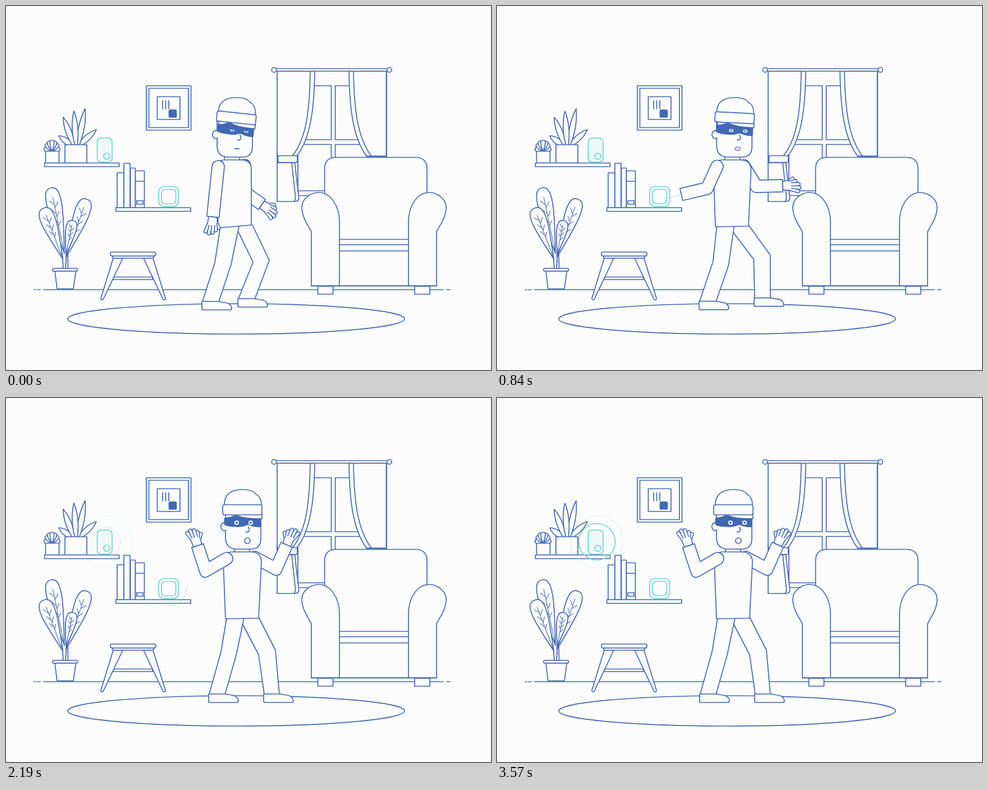
An HTML page that plays this animation: 864x648 px, repeating every 3600 ms.

```html
<!DOCTYPE html>
<html lang="en">
<head>
<meta charset="utf-8">
<title>Room sensor</title>
<style>
  html, body { margin: 0; width: 100%; height: 100%; overflow: hidden; background: #fcfcfc; }
  svg { display: block; width: 100%; height: 100%; }
  .ink { stroke: #4068b4; stroke-width: 1.7; fill: #fcfcfc; stroke-linejoin: round; stroke-linecap: round; }
  .line { fill: none; }
  .solid { fill: #4068b4; }
  .thin { stroke-width: 1.1; fill: none; }
  .teal { stroke: #6dd4cf; stroke-width: 1.7; fill: none; stroke-linecap: round; }
  .bare { stroke: none; }
  .in { stroke: #fcfcfc; stroke-width: 4.2; }
  .out { stroke-width: 7.4; }
</style>
</head>
<body>
<svg viewBox="0 0 864 648">
  <defs>
    <pattern id="mesh" width="2.500" height="2.500" patternUnits="userSpaceOnUse">
      <circle cx="1.250" cy="1.250" r=".6" fill="#6dd4cf" opacity=".6"/>
    </pattern>
    <g id="hand">
      <path class="out" d="M8 5L18 12"/><path class="in" d="M8 5L18 12"/>
      <path class="out" d="M11 -5L27 -10.5"/><path class="in" d="M11 -5L27 -10.5"/>
      <path class="out" d="M11 5L23 7.5"/><path class="in" d="M11 5L23 7.5"/>
      <path class="out" d="M11 -2L29.5 -4.2"/><path class="in" d="M11 -2L29.5 -4.2"/>
      <path class="out" d="M11 2L28 2.200"/><path class="in" d="M11 2L28 2.200"/>
      <path class="bare" d="M0 -7.5L12 -8L15 -6V5L9 8L0 7.5Z"/>
      <path class="line" d="M12 -8.500L0 -7.5V7.5L7 8.500"/>
    </g>
    <path id="shoe" d="M0 0V13Q0 15 2 15H50Q53 15 53 12C52 5 47 2 38 1.5L29 0Z"/>
    <path id="armrest" d="M544 498V402C536 387 527 375 527 358C527 343 543 332 557 332C579 332 594 357 594 384V498Z"/>
    <path id="stoolLeg" d="M191 449L169 520.5Q169 524 173 522.5L208 449Z"/>
  </defs>

  <g class="ink">
    <path class="line" d="M50 505h3M56 505h5M67 505H779M785 505h6"/>
    <ellipse cx="410" cy="557" rx="300" ry="27"/>

    <!-- picture -->
    <rect x="250" y="142" width="79.5" height="79"/>
    <rect x="254.5" y="146.5" width="70.5" height="70"/>
    <rect x="269.5" y="161.5" width="40.5" height="40.5"/>
    <path d="M279 168.500V183M284.500 168.500V183M290 168.500V183"/>
    <rect class="solid" x="290.500" y="185" width="13" height="13" rx="2"/>

    <!-- upper shelf -->
    <g id="petals"></g>
    <rect x="70.5" y="258.500" width="24" height="21"/>
    <g id="blades"></g>
    <rect x="105" y="247" width="39" height="32.500"/>
    <rect x="68.500" y="279.500" width="133" height="6.500"/>

    <!-- lower shelf -->
    <rect x="198" y="297" width="12" height="62"/>
    <rect x="210" y="280" width="11" height="79"/>
    <rect x="221.500" y="288.500" width="9" height="70.500" rx="1"/>
    <rect x="230.500" y="293.500" width="16" height="65.500"/>
    <path d="M230.500 312H246.500"/>
    <rect x="233" y="346.500" width="11" height="6.500"/>
    <rect x="195.500" y="359" width="133.500" height="6.500"/>

    <!-- floor plant -->
    <path class="line" d="M102 467L100 440M106 467Q108 450 107 430M110.500 467L110 435"/>
    <g id="leaves"></g>
    <path d="M87 472L91 503.500H120L124.500 472Z"/>
    <rect x="83" y="467" width="44.500" height="5" rx="2.500"/>

    <!-- stool -->
    <path d="M192 482.500H261V487H190Z"/>
    <use href="#stoolLeg"/>
    <use href="#stoolLeg" transform="matrix(-1 0 0 1 453 0)"/>
    <path d="M189 445H264L262 449H191Z"/>
    <rect x="186" y="438" width="81" height="7" rx="3"/>

    <!-- window -->
    <path d="M520 142H579.500V238H520ZM586.500 142H650V238H586.500ZM520 246.500H579.500V329H520ZM586.500 246.500H650V329H586.500ZM510 337.500H570"/>
    <path d="M483 116H550C549 190 541 238 518 267H483Z"/>
    <path class="line" d="M542 116C541 190 534 238 510 267"/>
    <path d="M483 279V348H516Q522 347 521.500 341L514.500 279Z"/>
    <path class="line" d="M509 279L515.500 339Q516 345 513 348M483 262V280"/>
    <rect x="484.500" y="266.500" width="34.500" height="12" rx="2.500"/>
    <path d="M677.500 116H611C612 190 620 238 643 268H677.500Z"/>
    <path class="line" d="M619 116C620 190 628 238 651 267M678 116V270M642 267H678"/>
    <rect x="480" y="111.500" width="204" height="4.500"/>
    <circle cx="477.500" cy="113.700" r="4.200"/>
    <circle cx="683" cy="113.700" r="4.200"/>

    <!-- armchair -->
    <path d="M567.500 420V290Q567.500 269.500 588 269.500H729Q750 269.500 750 290V420Z"/>
    <path d="M590 415.500H720V498H590ZM594 425H717M594 436H717"/>
    <use href="#armrest"/>
    <use href="#armrest" transform="matrix(-1 0 0 1 1311 0)"/>
    <path d="M544 498.500H767"/>
    <rect x="555.500" y="499" width="27" height="14"/>
    <rect x="728" y="499" width="27" height="14"/>
  </g>

  <!-- sensors -->
  <rect class="teal" x="162.500" y="235" width="26.500" height="43" rx="7" style="fill:url(#mesh)"/>
  <circle class="teal" cx="179.500" cy="267.500" r="5.500" style="fill:#fcfcfc"/>
  <path class="teal" d="M177 267h.1M181 265.500h.1M180 269.500h.1"/>
  <rect class="teal" x="272" y="321.500" width="35.500" height="35.500" rx="9"/>
  <rect class="teal" x="277" y="326.500" width="25.500" height="25.500" rx="6"/>

  <!-- intruder -->
  <g class="ink">
    <path id="armR"/><use id="handR" href="#hand"/>
    <path id="legR"/><use id="shoeR" href="#shoe"/>
    <path id="legL"/><use id="shoeL" href="#shoe"/>
    <rect id="neck" x="407" y="262" width="27" height="14"/>
    <path id="torso"/>
    <g id="head">
      <path d="M391 205V248Q391 269 412 269H436Q454 269 454 250V205Z"/>
      <path d="M392 222C384 220 381 228 384 233C386 237 390 237 392 235"/>
      <path class="line" d="M432 230Q435 236 432 238Q430 239.500 427.500 238"/>
      <ellipse id="mouth" cy="254"/>
      <path id="dome" d="M389 195V190C389 178 394 163 421 163C433 163 441 165 445 171C451 174 455 180 455 190V195Z"/>
      <g id="brow">
        <path d="M391 207V214Q402 213 409 208Q424 216 456 215V207Z"/>
        <path class="solid" d="M389.500 214.500Q402 213 410 210Q425 215.500 454 215V229Q443 229.500 437 227Q431 224 426 227Q419 229.500 405 228.500Q394 228 389.500 225Z"/>
        <g id="eyes">
          <ellipse class="bare" cx="416" cy="222" rx="4"/>
          <ellipse class="bare" cx="441" cy="222" rx="4"/>
          <ellipse class="bare solid" cx="416" cy="222" rx="2"/>
          <ellipse class="bare solid" cx="441" cy="222" rx="2"/>
        </g>
        <rect x="386" y="190" width="70" height="18" rx="3"/>
      </g>
    </g>
    <path id="armL"/><use id="handL" href="#hand"/>
  </g>

  <g id="waves" class="teal"></g>
  <g id="rings" class="teal"></g>
</svg>

<script>
const LOOP = 3600;
const $ = id => document.getElementById(id);
const set = (el, attrs) => { for (const k in attrs) el.setAttribute(k, attrs[k]); return el; };
const add = (parent, tag, attrs) =>
  parent.appendChild(set(document.createElementNS('http://www.w3.org/2000/svg', tag), attrs));
const clamp = x => Math.max(0, Math.min(1, x));
const smooth = (a, b, t) => { const x = clamp((t - a) / (b - a)); return x * x * (3 - 2 * x); };
const mix = (a, b, k) => a.map((v, i) => v + (b[i] - v) * k);
const RAD = Math.PI / 180;

// Leaf drawn along its own x axis, then turned towards the tip.
function leaf(parent, x, y, tx, ty, shape) {
  const len = Math.hypot(tx - x, ty - y), turn = Math.atan2(ty - y, tx - x) / RAD;
  const el = add(parent, 'path', { d: shape(len), transform: `translate(${x} ${y}) rotate(${turn})` });
  return [len, el];
}
const blade = l => `M0 -2Q${l * .55} -9 ${l} 0Q${l * .55} 9 0 2`;
const rounded = w => l =>
  `M0 0C${l * .45} ${-w * .55} ${l * 1.02} ${-w * 1.45} ${l} 0C${l * 1.02} ${w * 1.45} ${l * .45} ${w * .55} 0 0`;

for (const b of [[129, 249, 161, 220], [119, 249, 94, 231], [121, 249, 102, 198],
                 [128, 249, 141, 183], [125, 249, 121, 187]]) leaf($('blades'), ...b, blade);

for (const a of [12, 168, 40, 140, 66, 114, 90])
  leaf($('petals'), 82, 260, 82 + 14 * Math.cos(a * RAD), 257 - 18 * Math.sin(a * RAD), rounded(5));

function veinedLeaf(x, y, tx, ty, w) {
  const [len, el] = leaf($('leaves'), x, y, tx, ty, rounded(w));
  let d = `M0 0H${len * .86}`;
  for (let i = 0; i < 3; i++) {
    const u = len * (.42 + i * .14), v = w * (.3 + i * .06);
    d += `M${u} 0l${w * .5} ${v}M${u + 5} 0l${w * .5} ${-v}`;
  }
  add($('leaves'), 'path', { d, class: 'thin', transform: el.getAttribute('transform') });
}
veinedLeaf(104, 440, 80, 324, 17);
veinedLeaf(107, 447, 144, 344, 17);
veinedLeaf(101, 450, 67, 360, 17);
veinedLeaf(107, 442, 119, 382, 12);

// head: dx, tilt, eye height, mouth x, rx, ry, mouth stroke
// arm: shoulder x, y, upper angle, lower angle, palm side
const poses = [
  { head: [-15, 6, 1.6, 426.5, 4.5, .7, 1],
    torso: [375, 274, 437, 273, 437, 390, 378, 395],
    legL: [382, 392, 372, 457, 350, 526, 379, 527, 401, 460, 415, 392],
    legR: [409, 392, 440, 456, 414, 521, 443, 522, 469, 453, 439, 390],
    armL: [378, 286, 96, 96, -1], armR: [425, 284, 100, 35, -1] },
  { head: [.5, 6, 1.6, 427, 4.5, .7, 1],
    torso: [384, 274, 450, 274, 446, 392, 387, 393],
    legL: [390, 392, 387, 457, 360, 524, 390, 525, 415, 466, 421, 392],
    legR: [409, 392, 465, 445, 458, 512, 487, 513, 494, 437, 446, 390],
    armL: [391, 285, 77.5, 77.5, -1], armR: [436, 285, 90, 66, -1] },
  { head: [0, 0, 4, 430, 5, 5, 1.7],
    torso: [387, 274, 455, 274, 450, 392, 391, 393],
    legL: [393, 392, 383, 452, 362, 527, 390, 528, 410, 458, 424, 392],
    legR: [416, 392, 450, 457, 460, 527, 487, 528, 480, 449, 450, 390],
    armL: [393, 286, 150, 252, 1], armR: [443, 284, 28, -66, -1] }
];

function drawArm(side, [x, y, a1, a2, palm]) {
  const w = 11, p = a1 * RAD, q = a2 * RAD;
  const ex = x + 43 * Math.cos(p), ey = y + 43 * Math.sin(p);
  const hx = ex + 47 * Math.cos(q), hy = ey + 47 * Math.sin(q);
  const n1 = [-Math.sin(p) * w, Math.cos(p) * w], n2 = [-Math.sin(q) * w, Math.cos(q) * w];
  const k = 1 + Math.cos(q - p), m = [(n1[0] + n2[0]) / k, (n1[1] + n2[1]) / k];
  const at = (cx, cy, n, s) => `${cx + n[0] * s} ${cy + n[1] * s} `;
  const inner = Math.sin(q - p) > 0 ? 1 : -1;
  const elbow = (s, from, to) => s === inner
    ? 'L' + at(ex, ey, m, s)
    : 'L' + at(ex, ey, from, s) + 'Q' + at(ex, ey, m, s) + at(ex, ey, to, s);
  set($('arm' + side), { d: 'M' + at(x, y, n1, -1) + `A${w} ${w} 0 0 0 ` + at(x, y, n1, 1) +
    elbow(1, n1, n2) + 'L' + at(hx, hy, n2, 1) + 'L' + at(hx, hy, n2, -1) + elbow(-1, n2, n1) + 'Z' });
  set($('hand' + side), { transform: `translate(${hx} ${hy}) rotate(${a2}) scale(1 ${palm})` });
}

function drawLeg(side, pts) {
  set($('leg' + side), { d: 'M' + pts.join(' ') });
  set($('shoe' + side), { transform: `translate(${pts[4] - 1} ${pts[5]})` });
}

function drawBody(t) {
  const walking = t < 570;
  const [a, b] = walking ? poses : poses.slice(1);
  const k = walking ? t / 570 : smooth(590, 1085, t);
  const part = name => mix(a[name], b[name], k);

  drawArm('L', part('armL'));
  drawArm('R', part('armR'));
  drawLeg('L', part('legL'));
  drawLeg('R', part('legR'));

  const [lx, ly, rx, ry, bx, by, cx, cy] = part('torso');
  set($('torso'), { d: `M${cx} ${cy}L${lx} ${ly + 16}Q${lx} ${ly} ${lx + 16} ${ly}` +
    `H${rx - 20}Q${rx} ${ry} ${rx} ${ry + 18}L${bx} ${by}Z` });

  const [dx, tilt, eye, mx, mrx, mry, pen] = part('head');
  set($('head'), { transform: `translate(${dx} 0)` });
  set($('neck'), { transform: `translate(${dx - tilt / 2} 0)` });
  set($('dome'), { transform: `translate(${tilt * .7} 0)` });
  set($('brow'), { transform: `rotate(${tilt} 421 240)` });
  set($('mouth'), { cx: mx, rx: mrx, ry: mry, 'stroke-width': pen });
  [...$('eyes').children].forEach((e, i) => set(e, { ry: i < 2 ? eye : eye / 2 }));
  const glance = smooth(1900, 1990, t) - smooth(2500, 2590, t);
  set($('eyes'), { transform: `translate(${-5 * glance} 0)` });
}

// Quarter arcs light up one after another: [start, turn]
const pulses = [[538, 0], [970, -90], [1640, 90], [2187, 90], [2690, 90]];
const arcs = [30.5, 43, 57, 72].map(r =>
  add($('waves'), 'path', { d: `M291 ${339 - r}A${r} ${r} 0 0 1 ${291 + r} 339` }));

function drawWaves(t) {
  const [start, turn] = pulses.filter(p => p[0] <= t).pop() || [LOOP, 0];
  set($('waves'), { transform: `rotate(${turn} 291 339)` });
  arcs.forEach((arc, i) => {
    const age = t - start - i * 30;
    set(arc, { opacity: clamp(age / 10) * clamp(1 - (age - 30) / 80) });
  });
}

const ringStarts = [1540, 2170, 2635, 2960, 3470];
const rings = ringStarts.map(() => add($('rings'), 'circle', { cx: 178, cy: 256 }));

function drawRings(t) {
  rings.forEach((ring, i) => {
    const age = Math.max(0, t - ringStarts[i]);
    const fade = age < 600 ? 1 - .8 * clamp((age - 250) / 350) : .2 * clamp((700 - age) / 100);
    set(ring, { r: 24 + 24 * (1 - Math.exp(-age / 231)), opacity: clamp((age - 10) / 60) * fade });
  });
}

function draw(now) {
  const t = now % LOOP;
  drawBody(t);
  drawWaves(t);
  drawRings(t);
}
const begin = performance.now();
function tick() {
  draw(performance.now() - begin);
  requestAnimationFrame(tick);
}
tick();
</script>
</body>
</html>
```
